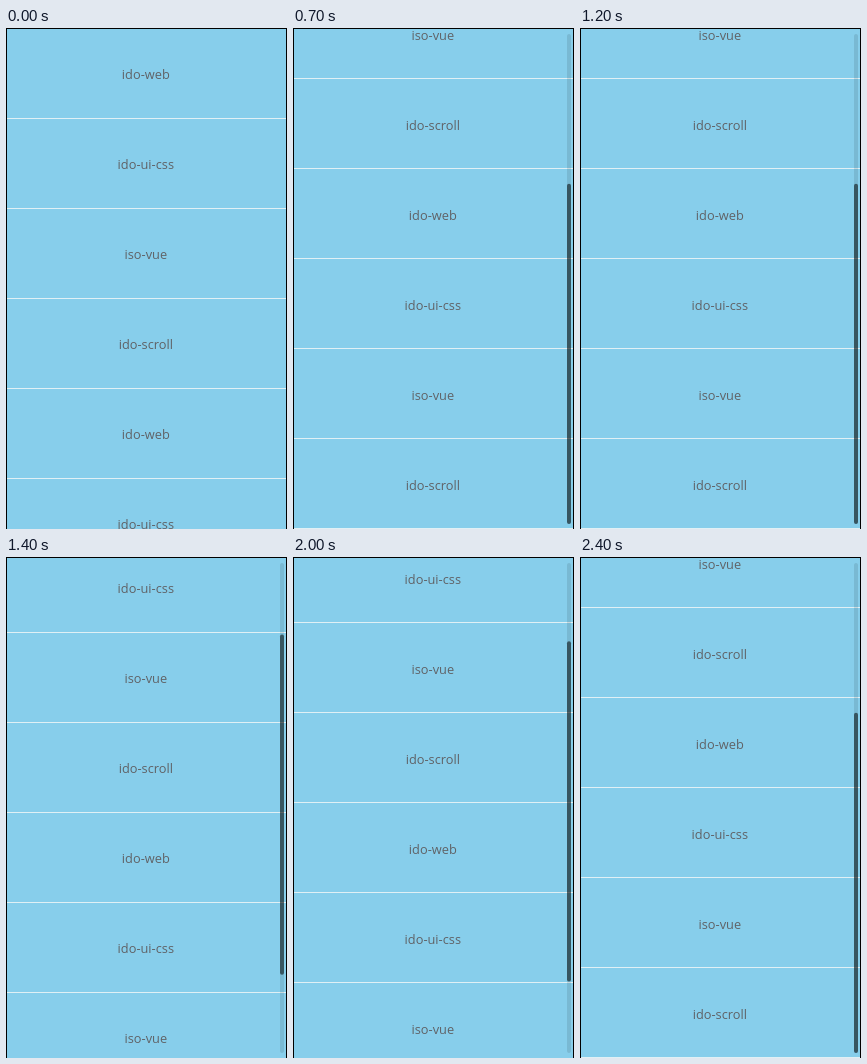
An HTML page with a canvas that plays this animation: 281 px wide and 501 px high, repeating every 2800 ms.

```html
<!DOCTYPE html>
<html lang="en">
<head>
<meta charset="utf-8">
<title>Elastic scroll list</title>
<style>
  html, body { margin: 0; width: 100%; height: 100%; overflow: hidden; background: #eee; }
  canvas { display: block; }
</style>
</head>
<body>
<canvas id="stage" width="281" height="501"></canvas>
<script>
const W = 281, H = 501, LOOP = 2800, TICK = 100;
const ROW = 90, ROWS = 8, VIEW = 500, END = 219.6;
const LABELS = ['ido-web', 'ido-ui-css', 'iso-vue', 'ido-scroll'];
const TRACK = { x: 274, y: 6, w: 4, h: 490 };

// Progress of a fling per tick, overshooting before it settles
const FLING = [0.522, 0.98, 1.105, 1.035, 1];
// Scroll offset per tick while the list is pulled past its end and springs back
const PULL = [290, 355.7, 272, 231, END];

const ctx = document.getElementById('stage').getContext('2d');

function follow(steps, t, start) {
  const i = Math.floor((t - start) / TICK);
  return steps[Math.min(i, steps.length - 1)];
}

function scrollAt(t) {
  if (t < 300) return 0;
  if (t < 800) return END * follow(FLING, t, 300);
  if (t < 1400) return follow(PULL, t, 800);
  if (t < 2000) return END - END * follow(FLING, t, 1400);
  return END * follow(FLING, t, 2000);
}

function bar(y, h, color) {
  ctx.fillStyle = color;
  ctx.beginPath();
  ctx.roundRect(TRACK.x, y, TRACK.w, h, 2);
  ctx.fill();
}

function drawRows(scroll) {
  const loose = scroll > END + 30;
  const snap = y => loose ? y : Math.round(y);
  for (let i = 0; i < ROWS; i++) {
    const top = 1 + i * ROW - scroll;
    if (top > H || top + ROW < 0) continue;
    const y = snap(top), bottom = snap(top + ROW);
    ctx.fillStyle = '#87ceeb';
    ctx.fillRect(1, y, W - 2, bottom - y);
    ctx.fillStyle = '#e0f0f5';
    ctx.fillRect(1, bottom - 1, W - 2, 1);
    ctx.fillStyle = '#606266';
    ctx.fillText(LABELS[i % LABELS.length], 139.8, Math.round(top + 50.2));
  }
}

function drawBar(scroll) {
  const full = TRACK.h * VIEW / (ROW * ROWS);
  const past = Math.max(-scroll, scroll - END, 0);
  const size = full - 0.3 * past - 0.0031 * past * past;
  const inside = Math.min(Math.max(scroll, 0), END) / END;
  bar(TRACK.y, TRACK.h, 'rgba(0,0,0,0.1)');
  bar(TRACK.y + inside * (TRACK.h - size), size, 'rgba(0,0,0,0.54)');
}

function draw(t) {
  const scroll = scrollAt(t);
  ctx.fillStyle = '#eee';
  ctx.fillRect(0, 0, W, H);
  ctx.font = '12.8px "Open Sans", "Noto Sans", sans-serif';
  ctx.textAlign = 'center';
  drawRows(scroll);
  if (t >= 300) drawBar(scroll);
  ctx.fillStyle = '#000';
  ctx.fillRect(0, 0, W, 1);
  ctx.fillRect(0, 0, 1, H);
  ctx.fillRect(W - 1, 0, 1, H);
}

const start = performance.now();
function frame() {
  draw((performance.now() - start) % LOOP);
  requestAnimationFrame(frame);
}
frame();
</script>
</body>
</html>
```
